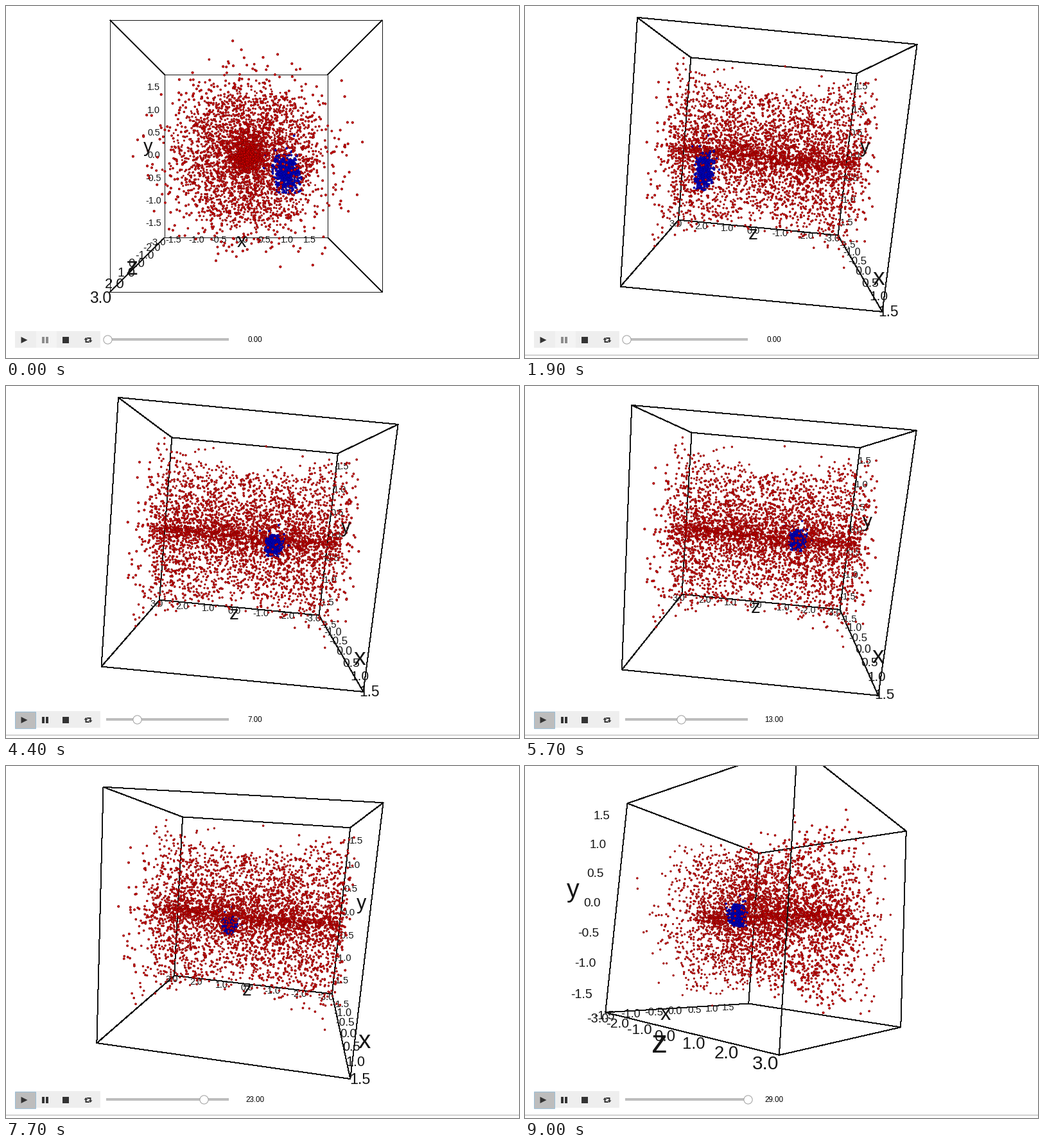
These frames come from a looping animation (799x549 px, 9100 ms). A matplotlib script:

```python
import itertools

import matplotlib.pyplot as plt
import numpy as np
from matplotlib.animation import FuncAnimation
from matplotlib.collections import LineCollection
from matplotlib.patches import Polygon, Rectangle

W, H, DPI = 799, 549, 64
PT = 72 / DPI                  # points per pixel
STEP, LOOP = 100, 9100
CX, CY, FOCAL, DIST = 374, 234.2, 636, 2.0
SCENE_H = 504
INK = "#141414"
ICON = "#333333"
FONT = "Liberation Sans"
PLAY_START = 3100

# mouse drags: start, end, then the yaw, pitch and roll reached
DRAGS = [(300, 700, 37, -6, 0), (1300, 1900, -90, 5.65, -5.5),
         (5400, 5700, -91.1, 9, -5.2), (6100, 6600, -115.6, 8.5, -1.9),
         (7200, 8300, -75.6, 7.5, -7.3), (8300, 8600, -15, 1, -6),
         (8700, 9000, 50.7, -6.2, -3.7)]
# turning and passing points of the cluster along z
SWING_V = (0, 4.6, 7.1, 10, 13.4, 17.8, 22, 26.1, 29.5)
SWING_Z = (.266, -.335, -.13, .2, -.16, -.036, .25, -.26, -.022)


def slider_value(t):
    return (t - 2950) / 205 if t >= PLAY_START else 0.0


def cluster_center(v):
    return (.174 * np.cos(.11 * v), -.035 - .04 * np.cos(.28 * v),
            np.interp(v, SWING_V, SWING_Z))


def camera(t):
    pose = np.zeros(3)
    for start, end, *goal in DRAGS:
        pose += (goal - pose) * np.clip((t - start) / (end - start), 0, 1)
    return rotation(*pose)


def rotation(yaw, pitch, roll):
    (cy, cp, cr), (sy, sp, sr) = (f(np.radians([yaw, pitch, roll]))
                                  for f in (np.cos, np.sin))
    ry = np.array([[cy, 0, sy], [0, 1, 0], [-sy, 0, cy]])
    rx = np.array([[1, 0, 0], [0, cp, -sp], [0, sp, cp]])
    rz = np.array([[cr, -sr, 0], [sr, cr, 0], [0, 0, 1]])
    return rz @ rx @ ry


def project(points, rot, shift=0):
    """Screen positions and distances from the camera."""
    p = points @ rot.T
    w = DIST - p[:, 2]
    xy = np.column_stack([CX + FOCAL * (p[:, 0] + shift) / w,
                          CY - FOCAL * p[:, 1] / w])
    return xy, w


# particles: a waisted cylinder with a dense axis, and a compact cluster
rng = np.random.default_rng(7)
N_RED, N_CORE, N_BLUE = 4200, 750, 500
z = rng.uniform(-.465, .465, N_RED)
reach = (.34 + .11 * (2 * z) ** 2) * (1 + .09 * rng.normal(size=N_RED))
r = reach * rng.random(N_RED) ** .72
r[:N_CORE] = np.abs(rng.normal(0, .06, N_CORE))
phi = rng.uniform(0, 2 * np.pi, N_RED)
red = np.column_stack([r * np.cos(phi) + .008, r * np.sin(phi), z])

blob = rng.normal(size=(N_BLUE, 3)).clip(-2.2, 2.2) * (.028, .036, .018)
blob[:16] *= 2.2
blob[:16, 1] = np.abs(blob[:16, 1])

kind = np.repeat([0, 1], [N_RED, N_BLUE])
FACE = np.array([(.84, 0, 0, 1), (0, 0, .78, 1)])
EDGE = np.array([(.5, 0, 0, 1), (0, 0, .55, 1)])

# box
corners = np.array(list(itertools.product((-.5, .5), repeat=3)))
edges = [(i, i | bit) for i in range(8) for bit in (1, 2, 4) if not i & bit]

# axes: name, ticks, span, tick offset, title offset, title half height
HALF = np.arange(-1.5, 1.6, .5)
AXES = [("x", HALF, 3.5, (0, -.027, -.075), (0, -.06, -.155), .265),
        ("y", HALF, 3.5, (-.055, .008, -.075), (-.11, .045, -.155), .16),
        ("z", np.arange(-3, 4), 6.1, (-.01, -.022, 0), (-.03, -.05, 0), .265)]


def on_axis(k, value):
    p = np.full(3, -.5)
    p[k] = value
    return p


labels = []                    # text, place, size, half height
for k, (name, ticks, span, tick_off, title_off, half) in enumerate(AXES):
    labels += [(f"{v:.1f}", on_axis(k, v / span) + tick_off, 37, .35)
               for v in ticks]
    labels.append((name, on_axis(k, 0) + title_off, 77, half))
label_pos = np.array([lab[1] for lab in labels])

# stage
fig = plt.figure(figsize=(W / DPI, H / DPI), dpi=DPI, facecolor="white")


def pixel_axes(height):
    ax = fig.add_axes([0, 1 - height / H, 1, height / H])
    ax.set_xlim(0, W)
    ax.set_ylim(height, 0)
    ax.axis("off")
    return ax


ui = pixel_axes(H)
scene = pixel_axes(SCENE_H)

back, front = (scene.add_collection(
    LineCollection([], colors=INK, linewidths=PT, antialiaseds=False,
                   zorder=order)) for order in (1, 4))
dots = scene.scatter(np.zeros(len(kind)), np.zeros(len(kind)),
                     marker=(6, 0, 0), linewidths=.7 * PT, zorder=3)
texts = [scene.text(0, 0, s, ha="center", va="baseline", color=INK,
                    fontname=FONT, clip_on=True,
                    zorder=5 if s.isalpha() else 2)
         for s, *_ in labels]


def rect(x, y, w, h, color, **kw):
    return ui.add_patch(Rectangle((x, y), w, h, facecolor=color, **kw))


def poly(points):
    return ui.add_patch(Polygon(points, facecolor=ICON, lw=0))


# player controls
rect(14, 507, 133, 26, "#eeeeee")
pause_bg = rect(47, 507, 32, 26, "#f4f4f4")
play_bg = rect(13.5, 507.5, 32.5, 26, "#bdbdbd", edgecolor="#5aa7dc",
               lw=.8 * PT, ls=(0, (1.5, 1)))
poly([(23.5, 516), (23.5, 526), (33.5, 521)])
bars = [rect(x, 516, 4, 10, ICON) for x in (56, 61.5)]
rect(88, 516, 10, 10, ICON)
arrow = np.array([(-6.5, -.5), (-3.5, -4), (-.5, -.5), (-2.5, -.5),
                  (-2.5, 2), (1, 2), (2.5, 4), (-4.5, 4), (-4.5, -.5)])
for sign in (1, -1):
    poly((128, 521) + sign * arrow)
rect(156, 518, 191, 4, "#bdbdbd")
knob, = ui.plot([158], [520], "o", ms=13.2 * PT, mfc="white",
                mec="#9e9e9e", mew=PT)
readout = ui.text(388, 524, "", ha="center", va="baseline", color="black",
                  fontname=FONT, fontsize=11.6 * PT)
rule = rect(0, 544, W, 1, "#ababab")


def draw_controls(t, value):
    shown = int(value)
    playing = t >= PLAY_START
    play_bg.set_visible(t >= 2900)
    pause_bg.set_visible(not playing)
    for bar in bars:
        bar.set_facecolor(ICON if playing else "#8c8c8c")
    knob.set_xdata([158 + 6.5 * shown])
    readout.set_text(f"{shown:.2f}")
    rule.set_visible(t >= 900)


def draw_box(rot):
    xy, w = project(corners, rot)
    near = [w[a] + w[b] < 2 * DIST for a, b in edges]
    for lines, side in ((front, True), (back, False)):
        lines.set_segments([xy[list(e)] for e, n in zip(edges, near)
                            if n == side])


def draw_dots(rot, value):
    squeeze = np.interp(value, [0, 6], [1, .6])
    blue = blob * (squeeze, squeeze, 1) + cluster_center(value)
    xy, w = project(np.vstack([red, blue]), rot)
    order = np.argsort(-w)
    dots.set_offsets(xy[order])
    dots.set_sizes((5.8 / w[order] * PT) ** 2)
    dots.set_facecolors(FACE[kind[order]])
    dots.set_edgecolors(EDGE[kind[order]])


def draw_labels(rot):
    xy, w = project(label_pos, rot, shift=-.028)
    for text, (_, _, size, half), (x, y), d in zip(texts, labels, xy, w):
        px = size / d
        text.set_position((x, y + half * px))
        text.set_fontsize(px * PT)


def draw(i):
    t = i * STEP
    value, rot = slider_value(t), camera(t)
    draw_controls(t, value)
    draw_box(rot)
    draw_dots(rot, value)
    draw_labels(rot)
    return []


anim = FuncAnimation(fig, draw, frames=LOOP // STEP, interval=STEP,
                     init_func=lambda: draw(0), repeat=True, repeat_delay=0,
                     blit=False)
plt.show()
```
